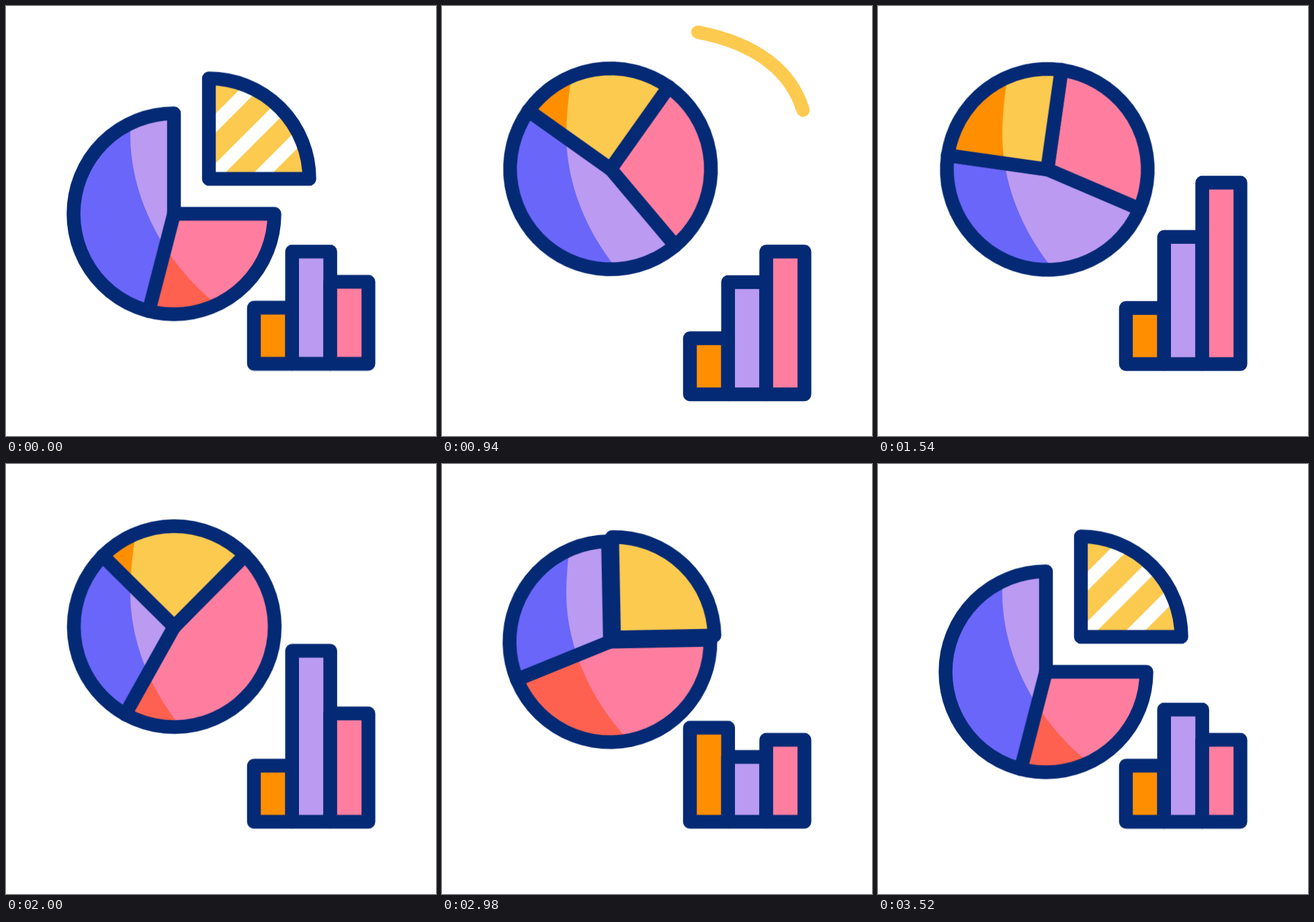
An HTML page without scripts that plays this animation: 640x640 px, repeating every 3600 ms.

```html
<!DOCTYPE html>
<html lang="en">
<head>
<meta charset="utf-8">
<title>Chart icon</title>
<style>
  html, body { margin: 0; width: 100%; height: 100%; overflow: hidden; background: #fff; }
  svg { display: block; width: 100vw; height: 100vh; }

  .line { fill: none; stroke: #042a75; stroke-width: 20.5; stroke-linecap: round; stroke-linejoin: round; }
  .pink { fill: #ff7ea0; }
  .red { fill: #ff6150; }
  .lilac { fill: #bb9af2; }
  .blue { fill: #6a66f9; }
  .yellow { fill: #fdca50; }
  .orange { fill: #ff8f00; }

  .lift, .spin, .pop, .cut, .stripes, .hop, .bar {
    animation: 3.6s cubic-bezier(.333, 0, .667, 1) infinite;
  }
  .lift { animation-name: lift; }
  .spin { animation-name: spin; transform-origin: 3px .6px; }
  .pop { animation-name: pop; }
  .cut { animation-name: cut; transform-origin: 0 0; }
  .stripes {
    animation-name: stripes;
    fill: none; stroke: #fff; stroke-width: 20; stroke-linecap: round; stroke-dasharray: 1 2;
  }
  .hop { animation-name: hop; }
  .bar { stroke: #042a75; stroke-width: 20.5; stroke-linejoin: round; }
  .left { animation-name: left; }
  .middle { animation-name: middle; }
  .right { animation-name: right; }
  .trail {
    fill: none; stroke: #fdca50; stroke-width: 20; stroke-linecap: round;
    animation: head 3.6s cubic-bezier(.333, 0, .667, 1) infinite,
               tail 3.6s cubic-bezier(.333, 0, .667, 1) infinite,
               show 3.6s step-end infinite;
  }

  /* the pie rises, turns and drops back */
  @keyframes lift {
    0%, 5.56% { transform: translateY(0); }
    14.8%, 78.7% { transform: translateY(-69.6px); }
    88.9%, 100% { transform: translateY(0); }
  }
  @keyframes spin {
    0%, 13.9% { transform: rotate(0deg); }
    35.3% { transform: rotate(-90deg); }
    75.7%, 82.8% { transform: rotate(-1.1deg); }
    97.8%, 100% { transform: rotate(0deg); }
  }
  @keyframes pop {
    0%, 5.56% { transform: translate(52px, -52px); }
    14.8%, 78.7% { transform: translate(0, 0); }
    97.8%, 100% { transform: translate(52px, -52px); }
  }
  @keyframes cut {
    0%, 42% { transform: rotate(104.5deg); }
    55.5%, 80.5% { transform: rotate(164.5deg); }
    92.8%, 100% { transform: rotate(104.5deg); }
  }
  @keyframes stripes {
    0%, 11.1% { stroke-dashoffset: 0; }
    23.3%, 86.1% { stroke-dashoffset: -1; }
    97.2%, 100% { stroke-dashoffset: 0; }
  }

  /* the bars hop and take turns growing */
  @keyframes hop {
    0%, 5.56% { transform: translateY(0); }
    15% { transform: translateY(-49.5px); }
    28.6% { transform: translateY(54.5px); }
    43.6%, 100% { transform: translateY(0); }
  }
  @keyframes left {
    0%, 58.3% { height: 83.5px; }
    79.6%, 83% { height: 140px; }
    97.2%, 100% { height: 83.5px; }
  }
  @keyframes middle {
    0%, 36.1% { height: 167px; }
    56.5%, 58.3% { height: 255px; }
    79.6%, 83% { height: 96.5px; }
    97.5%, 100% { height: 167px; }
  }
  @keyframes right {
    0%, 13.05% { height: 122px; }
    35.8%, 42.6% { height: 270px; }
    62.2%, 100% { height: 122px; }
  }

  /* the trail grows at its head, then its tail catches up */
  @keyframes head {
    0%, 9.25% { stroke-dasharray: 0 2; }
    24.1%, 100% { stroke-dasharray: 1 2; }
  }
  @keyframes tail {
    0%, 21.3% { stroke-dashoffset: 0; }
    36.1%, 100% { stroke-dashoffset: -1; }
  }
  @keyframes show {
    0% { opacity: 0; }
    9.4% { opacity: 1; }
    36.1%, 100% { opacity: 0; }
  }
</style>
</head>
<body>
<svg viewBox="0 0 640 640">
  <defs>
    <path id="body" d="M0 0V-149.5A149.5 149.5 0 1 0 149.5 0Z"/>
    <path id="wedge" d="M0 0V-149.5A149.5 149.5 0 0 1 149.5 0Z"/>
    <path id="upper" d="M0 0V-149.5A149.5 149.5 0 0 0 -140.5 -51.1Z"/>
    <path id="lower" d="M0 0H149.5A149.5 149.5 0 0 1 -26 147.2Z"/>
    <clipPath id="inWedge"><use href="#wedge"/></clipPath>
    <clipPath id="shade">
      <path d="M0 60H202L191 117C187 145 185 170 185 192C185 285 235 378 305 437L360 480V640H0Z"/>
    </clipPath>
  </defs>

  <path class="trail" pathLength="1" d="M543 223C552 130 500 62 381 39"/>

  <g transform="translate(250 309.3)"><g class="lift"><g class="spin">
    <use href="#body" class="pink"/>
    <use href="#upper" class="lilac"/>
    <g class="cut"><use href="#lower" class="lilac"/></g>
  </g></g></g>

  <g clip-path="url(#shade)">
    <g transform="translate(250 309.3)"><g class="lift"><g class="spin">
      <use href="#body" class="red"/>
      <use href="#upper" class="blue"/>
      <g class="cut"><use href="#lower" class="blue"/></g>
    </g></g></g>
  </g>

  <g transform="translate(250 309.3)"><g class="lift"><g class="spin">
    <g class="cut"><path class="line" d="M0 0H149.5"/></g>
    <use href="#body" class="line"/>
    <g class="pop"><use href="#wedge" class="yellow"/></g>
  </g></g></g>

  <g clip-path="url(#shade)">
    <g transform="translate(250 309.3)"><g class="lift"><g class="spin"><g class="pop">
      <use href="#wedge" class="orange"/>
    </g></g></g></g>
  </g>

  <g transform="translate(250 309.3)"><g class="lift"><g class="spin"><g class="pop">
    <g clip-path="url(#inWedge)"><g class="stripes">
      <path pathLength="1" d="M-5 -68L75 -148"/>
      <path pathLength="1" d="M-4 5L110 -109"/>
      <path pathLength="1" d="M68 4L142 -70"/>
    </g></g>
    <use href="#wedge" class="line"/>
  </g></g></g></g>

  <g class="hop"><g transform="translate(369 532.5) scale(1 -1)">
    <rect class="bar left orange" width="56.8" height="83.5"/>
    <rect class="bar middle lilac" x="56.8" width="56.8" height="167"/>
    <rect class="bar right pink" x="113.6" width="56.8" height="122"/>
  </g></g>
</svg>
</body>
</html>
```
